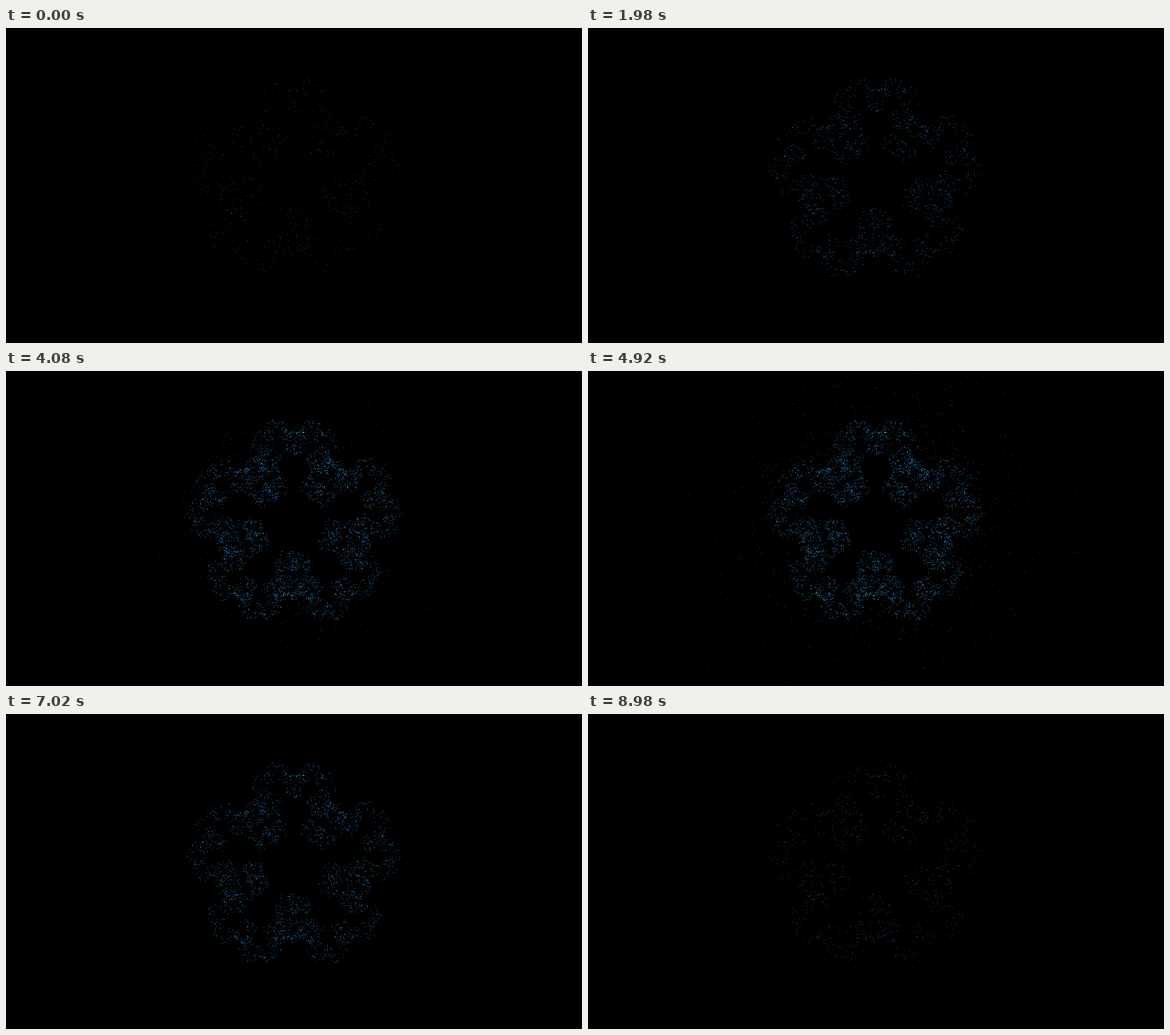
Animation, 1011 px wide and 554 px high, one loop 9 s. Source, as an HTML page with a canvas:

```html
<!DOCTYPE html>
<html lang="en">
<head>
<meta charset="utf-8">
<title>Fivefold dust</title>
<style>
  html, body { margin: 0; width: 100%; height: 100%; overflow: hidden; background: #000; }
  canvas { display: block; }
</style>
</head>
<body>
<canvas id="stage" width="1011" height="554"></canvas>
<script>
const ctx = document.getElementById('stage').getContext('2d');
const LOOP = 9000, PEAK = 5000, TAU = Math.PI * 2;
const CX = 505.5, CY = 268, RX = 67.3, RY = 64.8;
const DOTS = 5400, HALO = 900, WARMUP = 20;

let seed = 90210;
function rnd() {
  seed = (seed + 0x6D2B79F5) | 0;
  let n = Math.imul(seed ^ (seed >>> 15), 1 | seed);
  n = (n + Math.imul(n ^ (n >>> 7), 61 | n)) ^ n;
  return ((n ^ (n >>> 14)) >>> 0) / 4294967296;
}
const clamp = v => Math.max(0, Math.min(1, v));

// Colours with cumulative shares
const PALETTE = [
  ['#1f72b8', 0.42], ['#2a5fc0', 0.66], ['#2c93c4', 0.8],
  ['#2f7448', 0.91], ['#5b6a3c', 0.96], ['#54429c', 1]
];
const pickColor = () => {
  const u = rnd();
  return PALETTE.find(([, share]) => u <= share)[0];
};

// Chaos game on a pentagon: leap 1.5 times the way to a corner, never the same corner twice
function chaosGame() {
  const dots = [];
  let x = 0, y = 0, corner = 0;
  for (let i = -WARMUP; i < DOTS; i++) {
    corner = (corner + 1 + Math.floor(rnd() * 4)) % 5;
    const a = corner * TAU / 5 - TAU / 4;
    x += 1.5 * (Math.cos(a) - x);
    y += 1.5 * (Math.sin(a) - y);
    if (i < 0) continue;
    dots.push({
      x: Math.floor(CX + RX * x),
      y: Math.floor(CY + RY * y),
      birth: i / DOTS,
      color: pickColor()
    });
  }
  return dots;
}

// Sparse cloud around the figure; farther dots need more light
function cloud() {
  return Array.from({ length: HALO }, () => {
    const r = 125 - 75 * Math.log(1 - rnd()), a = rnd() * TAU;
    return {
      x: Math.floor(CX + r * Math.cos(a)),
      y: Math.floor(CY + r * Math.sin(a)),
      birth: 0.1 + (r - 125) / 600 + 0.5 * rnd(),
      color: rnd() < 0.55 ? '#4c6350' : '#2f5d86'
    };
  });
}

const core = chaosGame(), halo = cloud();

function plot(dots, level, base, gain) {
  for (const d of dots) {
    if (d.birth >= level) continue;
    ctx.globalAlpha = base + (1 - base) * clamp((level - d.birth) * gain);
    ctx.fillStyle = d.color;
    ctx.fillRect(d.x, d.y, 1, 1);
  }
}

function draw(now) {
  const t = now % LOOP;
  const light = 0.5 + 0.5 * Math.cos(TAU * (t - PEAK) / (2 * PEAK));
  ctx.globalCompositeOperation = 'source-over';
  ctx.globalAlpha = 1;
  ctx.fillStyle = '#000';
  ctx.fillRect(0, 0, 1011, 554);
  ctx.globalCompositeOperation = 'lighter';
  plot(core, 0.12 + 0.88 * light, 0.6, 2);
  plot(halo, clamp((light - 0.82) / 0.18), 0.6, 1.5);
  requestAnimationFrame(draw);
}
requestAnimationFrame(draw);
</script>
</body>
</html>
```
